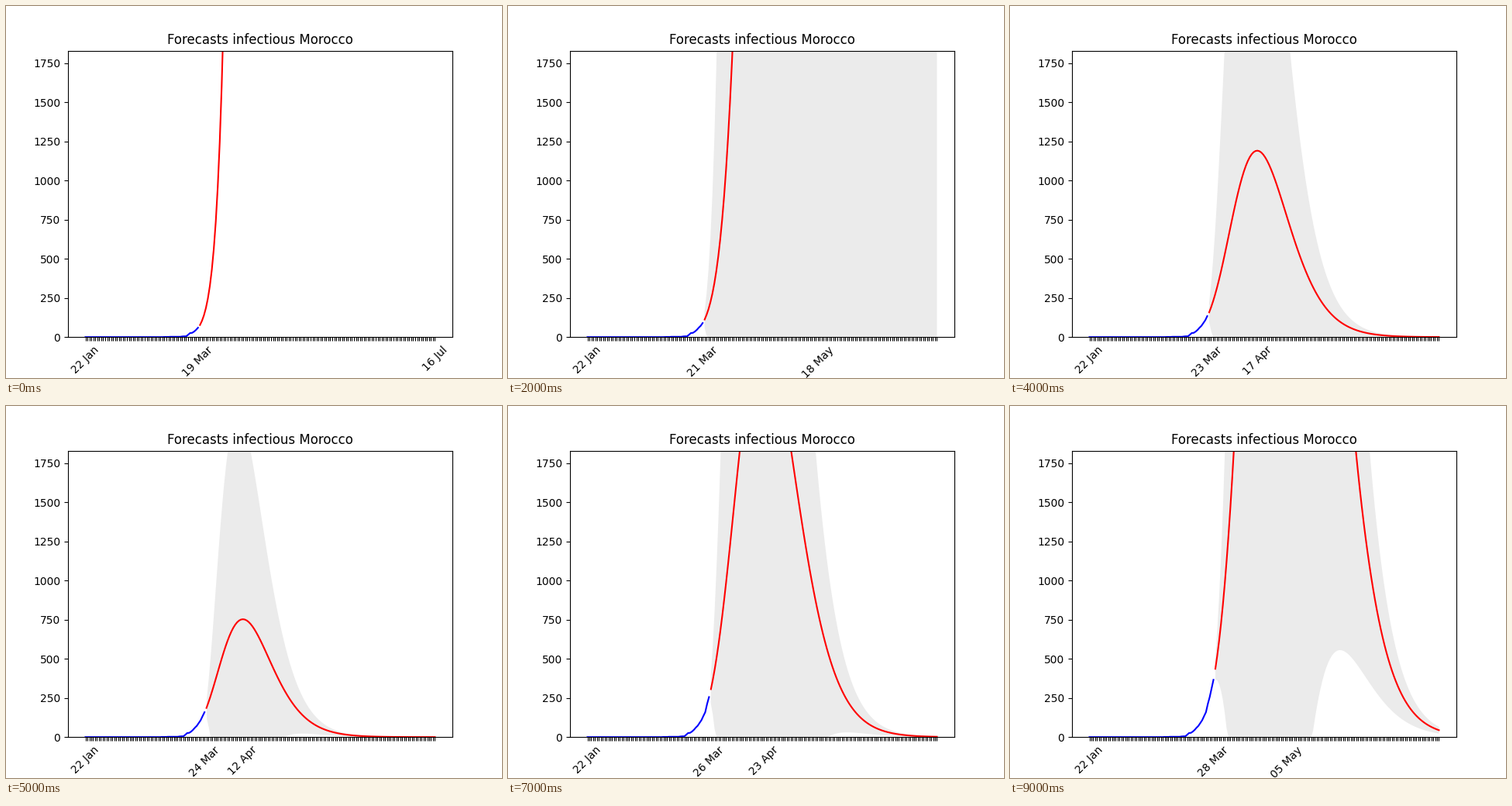
Write a matplotlib script that moves like this. It is 640x480 px and loops after 10 s.

```python
import matplotlib.pyplot as plt
import numpy as np
from matplotlib.animation import FuncAnimation

HORIZON = 120          # forecast length in days
TOP = 1830             # upper limit of the y axis
RECOVERY = 0.11        # daily recovery rate
FIRST_LAST = 57        # last observed day of the first forecast, from 22 Jan
FIRST_CASE = 40
CASES = [1, 1, 1, 2, 2, 2, 2, 2, 2, 4, 5, 5, 15, 26, 27, 35, 46, 60, 72,
         90, 108, 134, 159, 212, 256, 311, 366]
OBSERVED = [0] * FIRST_CASE + CASES
MONTHS = [("Jan", 31), ("Feb", 29), ("Mar", 31), ("Apr", 30),
          ("May", 31), ("Jun", 30), ("Jul", 31)]

# start count, contact rate, its daily decay, band growth, band fade
FORECASTS = [
    (77, 0.410, 0.0110, 0, 1),
    (92, 0.385, 0.0105, 0, 1),
    (112, 0.3515, 0.0200, 0.475, 300),
    (131, 0.3229, 0.0332, 0.457, 124),
    (158, 0.305, 0.0410, 0.40, 75),
    (186, 0.2844, 0.0500, 0.36, 44),
    (252, 0.3005, 0.03715, 0.358, 72),
    (306, 0.295, 0.0357, 0.31, 66),
    (368, 0.2899, 0.0343, 0.255, 60),
    (436, 0.2893, 0.0255, 0.153, 60),
]


def date(day):
    day += 22
    for name, length in MONTHS:
        if day <= length:
            return f"{day:02d} {name}"
        day -= length


def infectious(start, contact, decay):
    """Growth with a contact rate that decays exponentially."""
    t = np.arange(HORIZON)
    spread = contact / decay * (1 - np.exp(-decay * t))
    return start * np.exp(spread - RECOVERY * t)


def margin(growth, fade):
    """Relative half width of the band: widens first, then narrows."""
    t = np.arange(1, HORIZON + 1)
    return growth * t / (1 + growth * t * t / fade)


fig = plt.figure(figsize=(6.4, 4.8), dpi=100)
ax = fig.add_subplot()


def draw(i):
    start, contact, decay, growth, fade = FORECASTS[i]
    last = FIRST_LAST + i
    end = last + HORIZON
    days = np.arange(last + 1, end + 1)
    mid = infectious(start, contact, decay)
    peak = days[mid.argmax()]

    ax.clear()
    if growth:
        half = mid * margin(growth, fade)
        ax.fill_between(days, np.maximum(mid - half, 0), mid + half,
                        color="#ebebeb", linewidth=0)
    ax.plot(OBSERVED[:last + 1], color="b")
    ax.plot(days, mid, color="r")

    # the forecast is dated from the last observed day
    labels = [""] * (end + 1)
    labels[0], labels[last], labels[peak] = date(0), date(last), date(peak - 1)
    ax.set_xticks(range(end + 1), labels, rotation=45)
    ax.set_xlim(-0.05 * end, 1.05 * end)
    ax.set_ylim(0, TOP)
    ax.set_title("Forecasts infectious Morocco")


anim = FuncAnimation(fig, draw, frames=len(FORECASTS), interval=1000,
                     repeat=True, repeat_delay=0)
plt.show()
```
